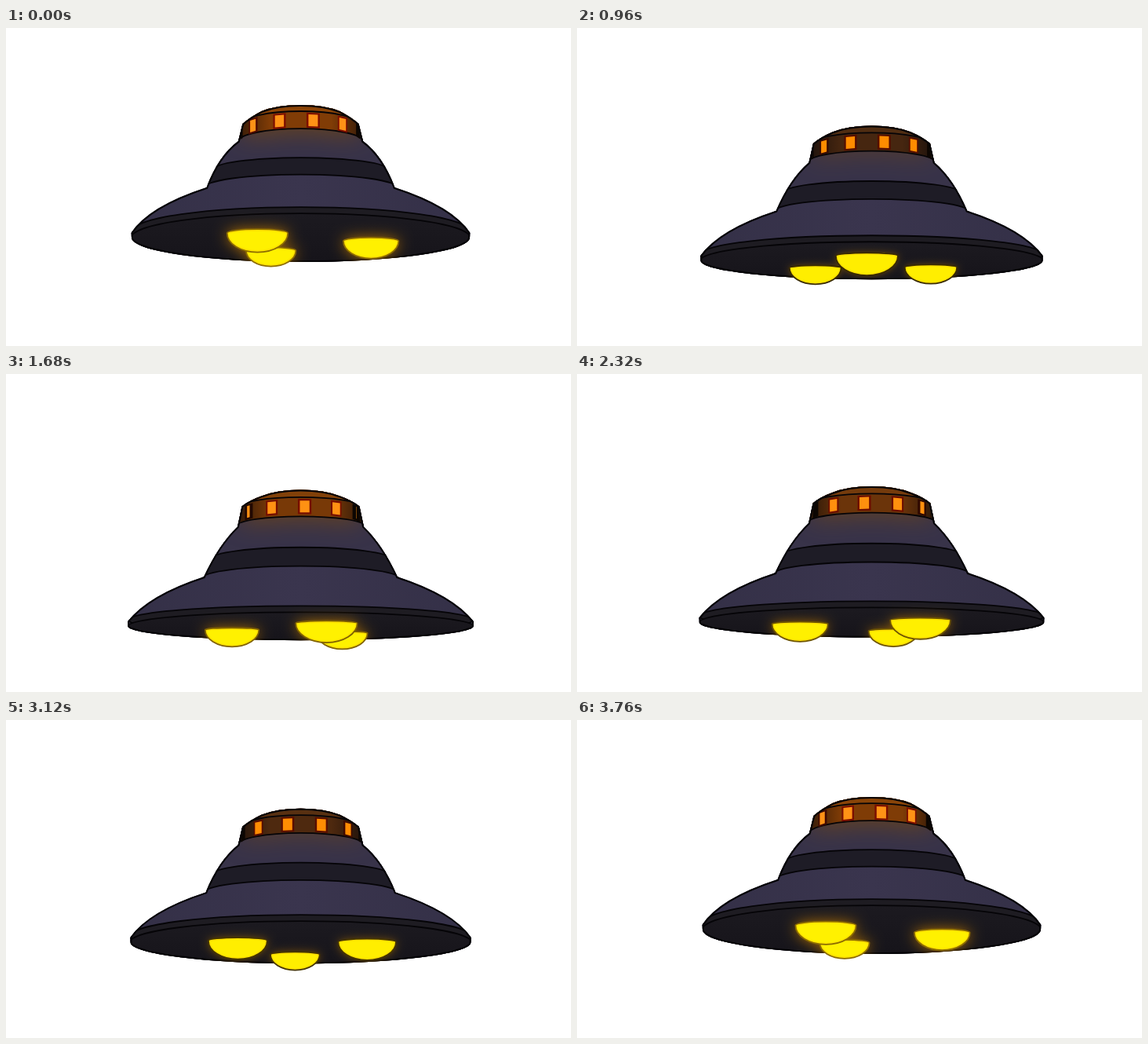
An HTML page with a canvas that plays this animation: 720x405 px, repeating every 3.84 s.

```html
<!DOCTYPE html>
<html lang="en">
<head>
<meta charset="utf-8">
<title>Flying saucer</title>
<style>
  html, body { margin: 0; width: 100%; height: 100%; overflow: hidden; background: #fff; }
  canvas { display: block; }
</style>
</head>
<body>
<canvas id="stage" width="720" height="405"></canvas>
<script>
const ctx = document.getElementById('stage').getContext('2d');
const LOOP = 3840, STEP = 80, CENTER_X = 375.5;
const TAU = Math.PI * 2, DEG = Math.PI / 180;
const INK = '#050407';

const mix = (a, b, k) => a + (b - a) * k;
const blend = (a, b, k) => `rgb(${a.map((v, i) => Math.round(mix(v, b[i], k)))})`;

function strokeLine(color, width) {
  ctx.strokeStyle = color;
  ctx.lineWidth = width;
  ctx.stroke();
}

// Silhouette, mirrored around x = 0; p is 0 at the top of the bob and 1 at the bottom
function hullPath(p, rim) {
  const collarX = 79.5 + p, collarY = 144 + 52 * p;
  const capX = 74 + p, capY = 122 + 48 * p, topY = 98 + 51 * p;
  const neckX = 120 + 3.5 * p, neckY = 203 + 57 * p;
  const tipY = rim.y - 6;
  const path = new Path2D();
  path.moveTo(-rim.rx, tipY);
  path.quadraticCurveTo(-194, 227 + 56 * p, -neckX, neckY);
  path.quadraticCurveTo(-105, 163 + 57 * p, -collarX, collarY);
  path.lineTo(-capX, capY);
  path.quadraticCurveTo(-65, capY - 8, -50, topY + 8);
  path.quadraticCurveTo(-30, topY, 0, topY);
  path.quadraticCurveTo(30, topY, 50, topY + 8);
  path.quadraticCurveTo(65, capY - 8, capX, capY);
  path.lineTo(collarX, collarY);
  path.quadraticCurveTo(105, 163 + 57 * p, neckX, neckY);
  path.quadraticCurveTo(194, 227 + 56 * p, rim.rx, tipY);
  path.ellipse(0, rim.y, rim.rx - 0.5, rim.ry, 0, 0, Math.PI);
  path.closePath();
  return path;
}

// Fills everything above the front edge of a ring and draws that edge
function fillAbove(y, rx, ry, fill) {
  ctx.beginPath();
  ctx.moveTo(-rx, 0);
  ctx.lineTo(-rx, y);
  ctx.ellipse(0, y, rx, ry, 0, Math.PI, TAU);
  ctx.lineTo(rx, 0);
  ctx.fillStyle = fill;
  ctx.fill();
  ctx.beginPath();
  ctx.ellipse(0, y, rx, ry, 0, Math.PI, TAU);
  strokeLine(INK, 1.8);
}

function shade(x0, y0, x1, y1, stops) {
  const g = ctx.createLinearGradient(x0, y0, x1, y1);
  stops.forEach((c, i) => g.addColorStop(i / (stops.length - 1), c));
  return g;
}

// Soft light spilling from under the collar; the collar covers the stroke itself
function collarGlow(y, rx, ry, glow) {
  ctx.save();
  ctx.shadowColor = `rgba(140,80,2,${0.5 + 0.4 * glow})`;
  ctx.shadowBlur = 32;
  ctx.beginPath();
  ctx.ellipse(0, y - 11, rx, ry, 0, 205 * DEG, 335 * DEG);
  strokeLine('#8a5008', 20);
  ctx.restore();
}

function drawWindow(deg, p, glow) {
  const ringY = 135.3 + 48 * p, ringR = 18 - 5 * p, side = Math.abs(deg);
  const pane = (half, h) => {
    const at = d => {
      const x = 75.6 * Math.sin(d * DEG) / (1 - 0.1 * Math.cos(d * DEG));
      return [x, ringY - ringR * Math.sqrt(Math.max(0, 1 - (x / 77) ** 2))];
    };
    const [xl, yl] = at(deg - half), [xr, yr] = at(deg + half);
    ctx.beginPath();
    ctx.moveTo(xl, yl - h);
    ctx.lineTo(xr, yr - h);
    ctx.lineTo(xr, yr + h);
    ctx.lineTo(xl, yl + h);
    ctx.closePath();
  };
  const edge = Math.min(1, Math.max(0, (side - 42) / 18));
  pane(5.9 + 2 * edge, 9.6);
  ctx.fillStyle = blend([84 + 40 * glow, 14, 0], [12, 6, 2], edge);
  ctx.fill();
  const open = Math.min(1, (65 - side) / 14);
  if (open > 0) {
    pane(4.2 * open, 7.5);
    ctx.fillStyle = blend([255, 140, 0], [255, 146, 22], glow);
    ctx.fill();
  }
}

function makeDome(deg, p, rim) {
  const depth = Math.sin(deg * DEG);
  const scale = 1 / (1 + 0.115 * depth);
  const x = 90 * Math.cos(deg * DEG) * scale - 0.8;
  const y = rim.y + mix(5, 3, p) + 0.417 * rim.ry * depth;
  const r = 35 * scale;
  const path = new Path2D();
  path.ellipse(x, y, r, r * 0.9 * rim.ry / rim.rx, 0, Math.PI, TAU);
  path.ellipse(x, y, r, r * 0.63, 0, 0, Math.PI);
  path.closePath();
  return { depth, path };
}

// Halos only show on the saucer itself
function drawHalo(path, glow) {
  ctx.save();
  ctx.globalCompositeOperation = 'source-atop';
  ctx.shadowColor = `rgba(190,120,0,${0.5 + 0.4 * glow})`;
  ctx.shadowBlur = 10 + 8 * glow;
  ctx.fillStyle = '#fe0';
  ctx.fill(path);
  ctx.restore();
}

function drawDome(path, glow) {
  ctx.fillStyle = blend([255, 238, 0], [255, 241, 0], glow);
  ctx.fill(path);
  ctx.save();
  ctx.clip(path);
  ctx.strokeStyle = 'rgba(255,205,0,0.4)';
  ctx.lineWidth = 5;
  ctx.stroke(path);
  ctx.restore();
  ctx.strokeStyle = blend([56, 42, 0], [140, 108, 0], glow);
  ctx.lineWidth = 1.8;
  ctx.stroke(path);
}

function draw(u) {
  const p = (1 - Math.cos(TAU * u + 2.5 * DEG)) / 2;
  const glow = (1 + Math.cos(2 * TAU * u)) / 2;
  const turn = 120 * u;
  const rim = { y: 267 + 56 * p, rx: 216 + 4.7 * p, ry: 31 - 13.5 * p };
  const hull = hullPath(p, rim);

  ctx.setTransform(1, 0, 0, 1, 0, 0);
  ctx.clearRect(0, 0, 720, 405);
  ctx.translate(CENTER_X, 0);

  ctx.save();
  ctx.clip(hull);
  ctx.fillStyle = shade(-216, 0, 216, 0, ['#343047', '#3a354e', '#343047']);
  ctx.fillRect(-240, 0, 480, 405);

  fillAbove(203.5 + 58 * p, 123 + 2 * p, 17 - 2 * p, '#1e1c26');
  fillAbove(181 + 56 * p, 112 + 2 * p, 16 - 1.5 * p, '#383349');

  const collarY = 145 + 50 * p, collarX = 80 + p, collarRy = 17 - 5 * p;
  collarGlow(collarY, collarX, collarRy, glow);
  const dark = blend([32, 19, 12], [56, 28, 8], glow);
  const warm = blend([70, 38, 16], [128, 60, 6], glow);
  fillAbove(collarY, collarX, collarRy, shade(-78, 0, 78, 0, [dark, warm, warm, warm, dark]));
  for (let i = -3; i < 3; i++) drawWindow(11 + turn % 30 + 30 * i, p, glow);
  fillAbove(123 + 48 * p, 76 + p, 17 - 4.5 * p, blend([80, 45, 18], [138, 68, 8], glow));

  // Rim edge and underside
  ctx.beginPath();
  ctx.ellipse(0, rim.y - 8, rim.rx - 1, rim.ry, 0, 0, TAU);
  ctx.fillStyle = '#1e1c22';
  ctx.fill();
  strokeLine(INK, 1.8);
  ctx.beginPath();
  ctx.ellipse(0, rim.y, rim.rx, rim.ry, 0, 0, TAU);
  ctx.fillStyle = shade(0, rim.y - rim.ry, 0, rim.y + rim.ry, ['#1c1a20', '#16141a']);
  ctx.fill();
  strokeLine(INK, 1.8);

  ctx.strokeStyle = INK;
  ctx.lineWidth = 4;
  ctx.stroke(hull);
  ctx.restore();

  const domes = [-3, 117, 237]
    .map(a => makeDome(a + turn, p, rim))
    .sort((a, b) => b.depth - a.depth);
  domes.forEach(d => drawHalo(d.path, glow));
  domes.forEach(d => drawDome(d.path, glow));
}

const start = performance.now();
function tick() {
  const t = (performance.now() - start) % LOOP;
  draw(Math.floor(t / STEP) * STEP / LOOP);
  requestAnimationFrame(tick);
}
tick();
</script>
</body>
</html>
```
